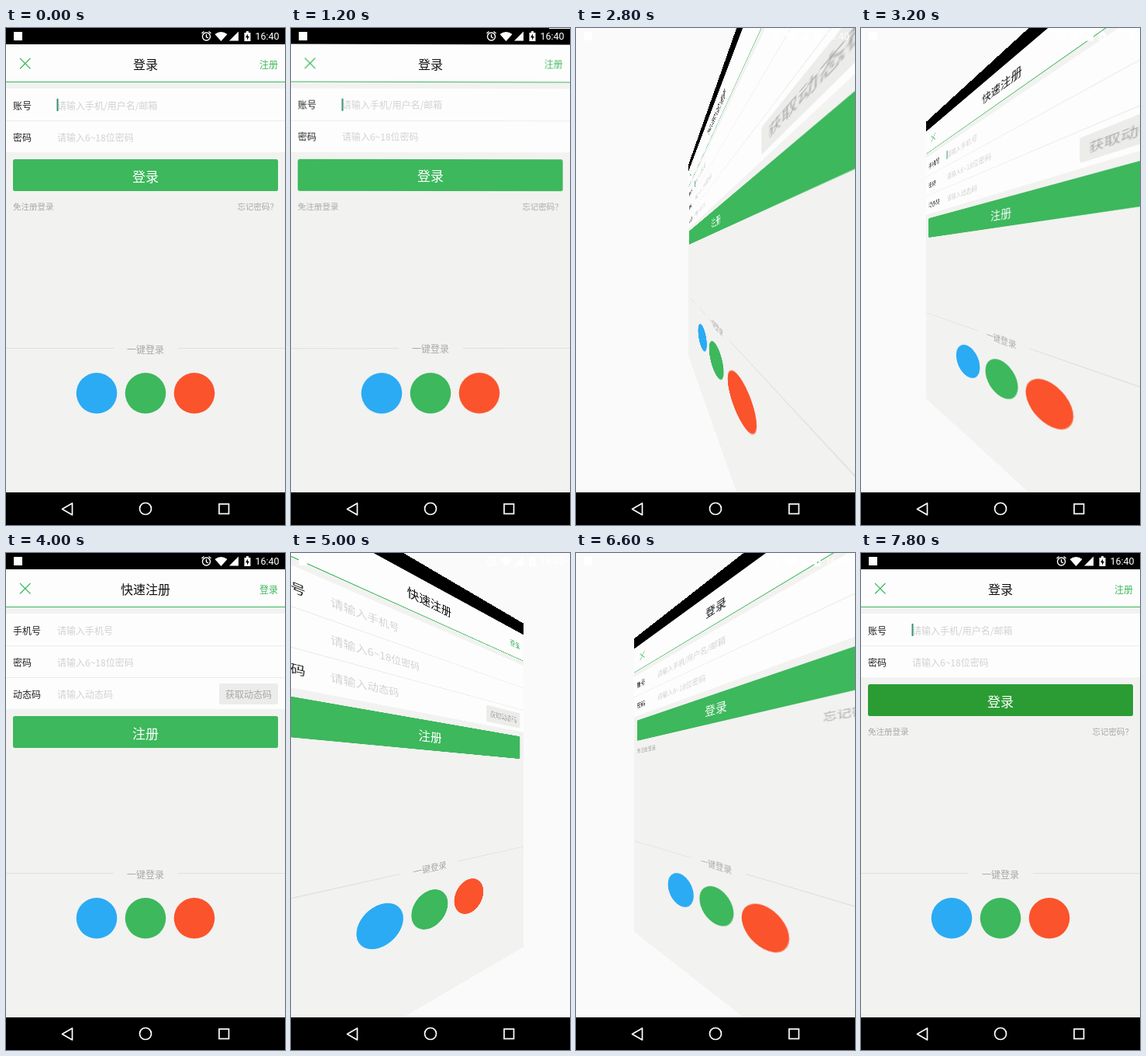
Animation, 360 px wide and 640 px high, one loop 8000 ms. Source, as an HTML page:

```html
<!DOCTYPE html>
<html lang="zh-CN">
<head>
<meta charset="utf-8">
<title>登录 / 注册</title>
<style>
  html, body { margin: 0; width: 100%; height: 100%; overflow: hidden; background: #fafafa; }
  #stage { position: relative; width: 360px; height: 640px; overflow: hidden; background: #fafafa; }
  svg { position: absolute; left: 0; top: 0; display: block; }
  #page { width: 360px; height: 598px; transform-origin: 180px 299px; }
  text { font-family: "Noto Sans CJK SC", "Noto Sans CJK JP", "Noto Sans", sans-serif; dominant-baseline: central; }
  .clock { font-family: Roboto, sans-serif; dominant-baseline: auto; }
</style>
</head>
<body>
<div id="stage">
  <svg id="page" viewBox="0 0 360 598"></svg>
  <svg width="360" height="640" viewBox="0 0 360 640">
    <g fill="#fff">
      <rect x="10" y="5" width="11" height="11"/>
      <path d="M269.5 8 Q277.5 2 285.5 8 L277.5 17Z"/>
      <path d="M300 4.5 V16.5 H288Z"/>
      <path fill-rule="evenodd" d="M307.5 6 H310 V4 H313 V6 H315.5 V17 H307.5Z M312 7.5 L309 12.3 H311 V15.5 L314 10.8 H312Z"/>
      <text class="clock" x="321.5" y="15" font-size="12.5">16:40</text>
    </g>
    <g fill="none" stroke="#fff" stroke-width="1.4">
      <circle cx="258.5" cy="11" r="5"/>
      <path d="M258.5 8 V11.5 L261 13 M252.5 7 L255.5 4.5 M264.5 7 L261.5 4.5"/>
    </g>
    <rect y="598" width="360" height="42" fill="#000"/>
    <g fill="none" stroke="#fff" stroke-width="1.7">
      <path d="M85.5 612 V627 L72.5 619.5Z" stroke-linejoin="round"/>
      <circle cx="180" cy="619" r="7.5"/>
      <rect x="275" y="613" width="12.5" height="12.5"/>
    </g>
  </svg>
</div>
<script>
const LOOP = 8000, STEP = 200, BLINK = 2600;
const CAMERA = 144, DEPTH = 79;
const FLIPS = [{ start: 1157, half: 1400 }, { start: 4351, half: 1500 }];
const PRESS_AT = 7600;
const GREEN = '#3db85c', PRESSED = '#2b9c34', PAPER = '#f2f2f1', WHITE = '#fdfdfd';
const INK = '#222', GRAY = '#a8a8a8', HINT = '#d2d2d2', RULE = '#ececec';

const rect = (x, y, w, h, fill, rx = 0) =>
  `<rect x="${x}" y="${y}" width="${w}" height="${h}" fill="${fill}" rx="${rx}"/>`;
const label = (x, y, size, fill, str, anchor = 'start') =>
  `<text x="${x}" y="${y}" font-size="${size}" fill="${fill}" text-anchor="${anchor}">${str}</text>`;
const disc = (x, fill) => `<circle cx="${x}" cy="470.3" r="26.3" fill="${fill}"/>`;

function pageMarkup({ title, other, rows, action, extra }) {
  const bottom = 78 + rows.length * 41;
  const fields = rows.map(([name, hint], i) => {
    const y = 99 + i * 41;
    return (i ? rect(0, y - 21, 360, 1, RULE) : '') +
      label(9, y, 12, INK, name) + label(66, y, 12, HINT, hint);
  }).join('');
  return rect(0, 0, 360, 598, PAPER) + rect(0, 0, 360, 21, '#000') +
    rect(0, 21, 360, 48, WHITE) + rect(0, 69, 360, 1, GREEN) +
    `<path d="M18 39 L31.5 52.5 M31.5 39 L18 52.5" stroke="${GREEN}" stroke-width="1.2"/>` +
    label(180, 46, 16, '#111', title, 'middle') + label(351, 46, 12, GREEN, other, 'end') +
    rect(0, 78, 360, bottom - 78, WHITE) + fields +
    `<rect class="cursor" x="65.5" y="91" width="2" height="16" fill="#349078"/>` +
    `<rect class="button" x="9" y="${bottom + 9}" width="342" height="41" rx="2.5" fill="${GREEN}"/>` +
    label(180, bottom + 30, 17, '#fff', action, 'middle') + extra +
    rect(0, 412, 139, 1, '#dfdfdf') + rect(222, 412, 138, 1, '#dfdfdf') +
    label(180, 413, 12, GRAY, '一键登录', 'middle') +
    disc(117, '#2aabf3') + disc(180, GREEN) + disc(243, '#fb532b');
}

const PAGES = {
  login: pageMarkup({
    title: '登录', other: '注册', action: '登录',
    rows: [['账号', '请输入手机/用户名/邮箱'], ['密码', '请输入6~18位密码']],
    extra: label(9, 229.5, 10.5, GRAY, '免注册登录') + label(351, 229.5, 10.5, GRAY, '忘记密码？', 'end')
  }),
  register: pageMarkup({
    title: '快速注册', other: '登录', action: '注册',
    rows: [['手机号', '请输入手机号'], ['密码', '请输入6~18位密码'], ['动态码', '请输入动态码']],
    extra: rect(275, 168, 76, 27, '#ececeb', 2) + label(313, 181, 12, GRAY, '获取动态码', 'middle')
  })
};

const page = document.getElementById('page');
let shown = '';

function show(name) {
  if (name === shown) return;
  page.innerHTML = PAGES[name];
  shown = name;
}

// Each flip accelerates away to 90° and decelerates back in from the other side.
function flipTransform(t) {
  for (const { start, half } of FLIPS) {
    const u = (t - start) / half;
    if (u <= 0 || u >= 2) continue;
    const turn = (u < 1 ? u : 2 - u) ** 2;
    const angle = (u < 1 ? 90 : -90) * turn;
    return `perspective(${CAMERA}px) translateZ(${-DEPTH * turn ** 1.2}px) rotateY(${angle}deg)`;
  }
  return 'none';
}

function draw(t) {
  const [there, back] = FLIPS.map(f => f.start + f.half);
  show(t >= there && t < back ? 'register' : 'login');
  page.style.transform = flipTransform(t);
  page.querySelector('.cursor').style.opacity = t % BLINK < BLINK / 2 ? 1 : 0;
  page.querySelector('.button').setAttribute('fill', t >= PRESS_AT ? PRESSED : GREEN);
}

const began = performance.now();
function tick() {
  const t = Math.max(0, performance.now() - began) % LOOP;
  draw(Math.floor(t / STEP) * STEP);
  requestAnimationFrame(tick);
}
tick();
</script>
</body>
</html>
```
